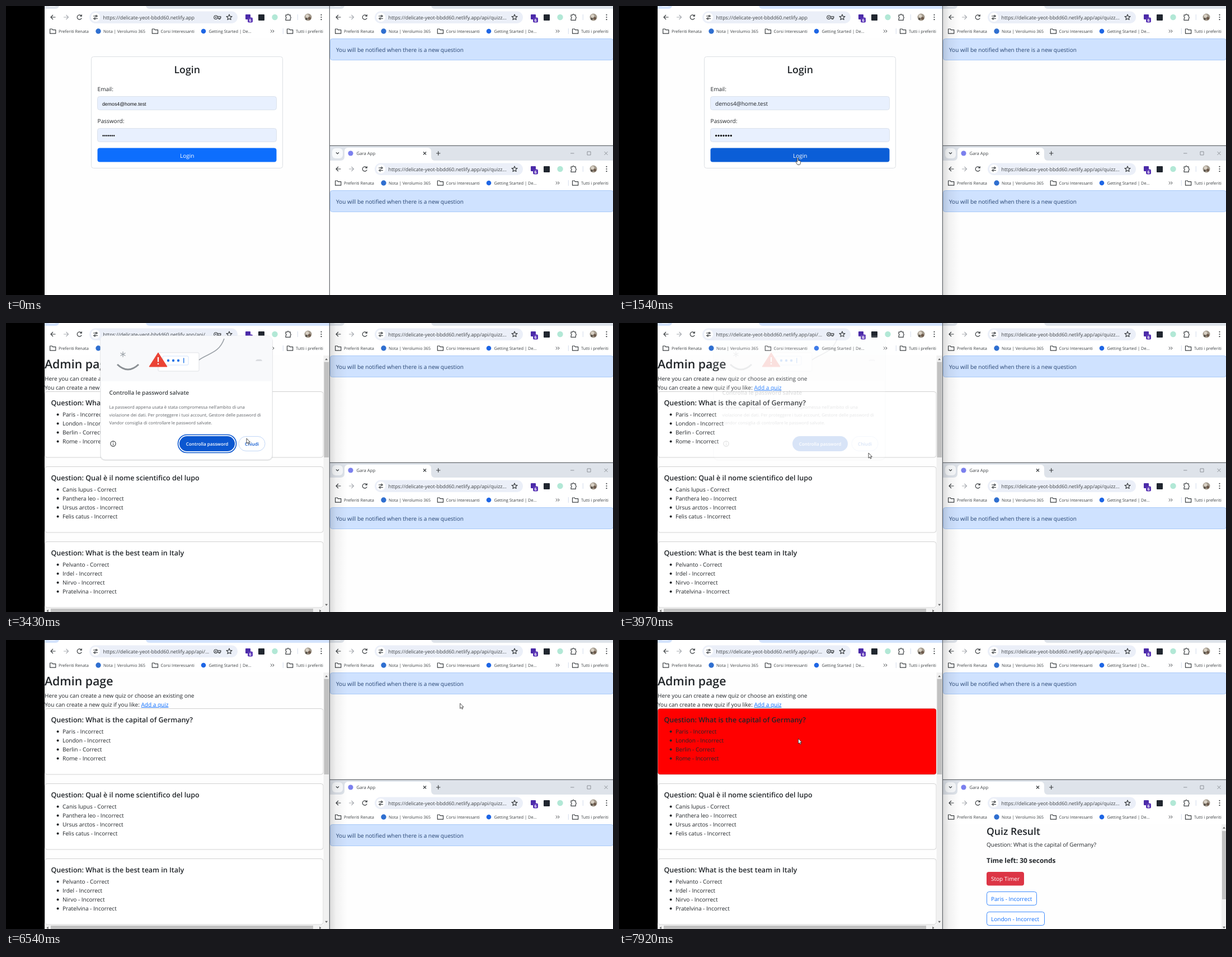
Write an HTML page that moves like this. It is 1085x516 px and loops after 7.99 s.

```html
<!DOCTYPE html>
<html lang="en">
<head>
<meta charset="utf-8">
<title>Quiz login</title>
<style>
  html, body { margin: 0; width: 100%; height: 100%; overflow: hidden; background: #fff; }
  svg { display: block; width: 1085px; height: 516px; }
  text { font-family: "Open Sans", "Noto Sans", sans-serif; text-rendering: geometricPrecision; white-space: pre; }
  .arial { font-family: "Liberation Sans", Arial, sans-serif; }
  .line { fill: none; stroke: #3c4043; stroke-width: 1.2; }
</style>
</head>
<body>
<svg id="stage" viewBox="0 0 1085 516"></svg>
<script>
const LOOP = 7990;
const INK = '#212529', BLUE = '#0d6efd';
const BODY = 10.04, UI = 7.45;

// ---- drawing helpers ----
const text = (x, y, size, str, fill = INK, attrs = '') =>
  `<text x="${x}" y="${y}" font-size="${size}" fill="${fill}" ${attrs}>${str}</text>`;
const rect = (x, y, w, h, fill, r = 0, attrs = '') =>
  `<rect x="${x}" y="${y}" width="${w}" height="${h}" rx="${r}" fill="${fill}" ${attrs}/>`;
const dot = (x, y, r, fill) => `<circle cx="${x}" cy="${y}" r="${r}" fill="${fill}"/>`;
const line = (d, attrs = '') => `<path class="line" d="${d}" ${attrs}/>`;
const stroke = c => `stroke="${c}"`;
const color = c => `style="stroke:${c}"`;
const group = (id, body, attrs = '') => `<g id="${id}" ${attrs}>${body}</g>`;
const SEMI = 'font-weight="600"', BOLD = 'font-weight="700"', MID = 'text-anchor="middle"';

function star(cx, cy, r) {
  let d = '';
  for (let i = 0; i < 10; i++) {
    const a = i * Math.PI / 5 - Math.PI / 2, q = i % 2 ? r * 0.45 : r;
    d += `${i ? 'L' : 'M'}${(cx + q * Math.cos(a)).toFixed(2)},${(cy + q * Math.sin(a)).toFixed(2)}`;
  }
  return line(d + 'Z', 'stroke-linejoin="round"');
}

const folder = x => line(`M${x},41h3.6l1.4,1.6h5.2v6.6h-10.2Z`, 'stroke-linejoin="round"');

function avatar(x, y) {
  return dot(x, y, 6.5, '#a39a8d') + dot(x - 1.5, y - 2, 3, '#d8d0c4') +
    dot(x + 2.5, y + 2, 2.6, '#6d5a4c') + dot(x - 3, y + 3, 2, '#57514a');
}

// Browser frame, laid out for the left window and shifted for the others.
function browser(id, dx, dy, url, withKey) {
  const strip = `<rect id="${id}Strip" x="69" y="-21" width="509" height="26" fill="#dee3ea"/>`;
  const tab = `<path d="M88,5q7,0 7,-7v-9q0,-7 7,-7h141q7,0 7,7v9q0,7 7,7Z" fill="#fff"/>` +
    rect(73, -17, 19, 18, '#f8fafc', 6) + line('M80,-9.5l2.5,2.5l2.5,-2.5') +
    dot(106, -8, 4.6, '#7b80ee') + text(116.5, -5.3, 7.75, 'Gara App', '#3c4043') +
    line('M236,-10.5l5,5m0,-5l-5,5') + line('M259,-8h7.4m-3.7,-3.7v7.4') +
    line('M499,-8h6.5M529,-11h6v6h-6ZM559.5,-11l6,6m0,-6l-6,6', 'style="stroke:#85898f;stroke-width:.9"');

  const nav = line('M88.5,20h-8.5m4,-4l-4,4l4,4') +
    line('M103,20h8.5m-4,-4l4,4l-4,4', color('#a9adb2')) +
    line('M134.6,17.6a4.1,4.1 0 1 0 .6,3.8M135.3,15.2v3h-3') +
    rect(149, 9.5, 265, 21.5, '#ebeff8', 10.75) + dot(160, 20, 8, '#fff') +
    line('M156,18h3.5M162.5,18h1.5M156,22.5h1.5M160.5,22.5h3.5') +
    `<circle class="line" cx="161.3" cy="18" r="1.3"/><circle class="line" cx="158.7" cy="22.5" r="1.3"/>` +
    text(173.5, 23.5, 8.87, url, '#3c4043', `id="${id}Url"`) +
    (withKey ? `<circle class="line" cx="375" cy="20.2" r="3.2"/>` + dot(375, 20.2, 1.1, '#3c4043') +
      line('M378,18.9h5.8v2.6h-1.2v1.8h-2.2v-1.8h-2.4') : '') +
    star(399, 20.3, 5.2);

  const tools = rect(428, 15, 9, 9, '#4b2ba8', 1) + rect(432, 20.5, 9, 9, '#5a35b5', 2) +
    text(436.5, 27.8, 7, '6', '#fff', `${MID} ${BOLD}`) +
    rect(451, 15, 11, 11, '#20262f', 1) + dot(480.5, 20, 5.2, '#b2e8d6') +
    line('M500,16.2h2.6a1.6,1.6 0 0 1 3.2,0h2.4v3a1.7,1.7 0 0 1 0,3.2v3h-8.2v-2.8a1.7,1.7 0 0 0 0,-3.2Z') +
    rect(520.8, 15, 1, 10, '#d4dcec') + avatar(540, 20) +
    [15.8, 20, 24.2].map(y => dot(563.5, y, 1.1, '#3c4043')).join('');

  const label = (x, s) => text(x, 48, UI, s, '#3c4043');
  const marks = folder(78.6) + label(94, 'Preferiti Renata') +
    dot(165, 45, 4.7, '#2f6fd0') + label(174, 'Nota | Verolumio 365') +
    folder(261.3) + label(276.5, 'Corsi Interessanti') +
    dot(353, 45, 4.3, '#1e66e5') + label(362.5, 'Getting Started | De...') +
    line('M473,42.5l2.5,2.5l-2.5,2.5M476.5,42.5l2.5,2.5l-2.5,2.5', 'style="stroke-width:1"') +
    rect(494.8, 40, 1, 10, '#d4dcec') + folder(502.5) + label(518, 'Tutti i preferiti');

  return `<g transform="translate(${dx} ${dy})">` + strip + tab +
    rect(69, 5, 509, 53, '#fff') + nav + tools + marks + '</g>';
}

function alertBox(y) {
  return rect(579.5, y + 0.5, 506, 38, '#cfe2ff', 4, stroke('#a9caf8')) +
    text(590, y + 23.5, BODY, 'You will be notified when there is a new question', '#274572');
}

function loginPage() {
  const field = y => rect(163.5, y, 320, 24, '#e8f0fe', 4, stroke('#dbe2ec'));
  const dots = (step, r) => Array.from({ length: 7 }, (_, i) => dot(173.6 + i * step, 231.5, r, '#111')).join('');
  return rect(69, 58, 509, 458, '#fefefe') +
    rect(152.5, 90.5, 342, 199, '#fff', 4, stroke('#dcdfe3')) +
    text(323.7, 120, 17.7, 'Login', INK, `${MID} ${SEMI}`) +
    text(163.6, 152, BODY, 'Email:') + field(161.5) +
    text(163.6, 209, BODY, 'Password:') + field(218.5) +
    group('preview', text(172, 178, 8.75, 'demos4@home.test', '#111', 'class="arial"') + dots(3.25, 1.25)) +
    group('filled', text(172, 177.7, BODY, 'demos4@home.test') + dots(4.45, 1.65)) +
    `<rect id="submit" x="163.5" y="253.5" width="320" height="25" rx="4"/>` +
    text(323.7, 270.6, BODY, 'Login', '#fff', MID);
}

function card(i, title, items) {
  const y = 122.5 + 134 * i;
  return rect(69.5, y, 497.5, 117.5, '#fff', 4, `stroke="#000" stroke-opacity=".175" id="card${i}"`) +
    text(80.5, y + 24, 12.5, 'Question: ' + title, INK, SEMI) +
    items.map(([name, mark], k) => dot(92.6, y + 41 + 16 * k, 2, INK) +
      text(101, y + 44.6 + 16 * k, BODY, `${name} - ${mark || 'Incorrect'}`)).join('');
}

const tri = (x, y, dx, dy) =>
  `<path d="M${x + dx * 2},${y + dy * 2}L${x - dx * 1.2 + dy * 2.4},${y - dy * 1.2 + dx * 2.4}L${x - dx * 1.2 - dy * 2.4},${y - dy * 1.2 - dx * 2.4}Z" fill="#666"/>`;

function adminPage() {
  const bars = rect(567.5, 58, 10.5, 451, '#f1f1f1') + rect(568.5, 69.5, 8.5, 170.5, '#c1c1c1') +
    tri(572.7, 65, 0, -1) + tri(572.7, 503, 0, 1) +
    rect(69, 509, 509, 7, '#f1f1f1') + rect(80, 510, 469, 6, '#c1c1c1') +
    tri(74.5, 514, -1, 0) + tri(561.5, 514, 1, 0);
  const right = name => [name, 'Correct'];
  return rect(69, 58, 509, 458, '#fefefe') +
    text(69, 81, 21.3, 'Admin page', INK, SEMI) +
    text(69, 102.7, BODY, 'Here you can create a new quiz or choose an existing one') +
    text(69, 118.7, BODY, 'You can create a new quiz if you like: ' +
      `<tspan fill="${BLUE}" text-decoration="underline">Add a quiz</tspan>`) +
    group('cards',
      card(0, 'What is the capital of Germany?', [['Paris'], ['London'], right('Berlin'), ['Rome']]) +
      card(1, 'Qual è il nome scientifico del lupo', [right('Canis lupus'), ['Panthera leo'], ['Ursus arctos'], ['Felis catus']]) +
      card(2, 'What is the best team in Italy', [right('Pelvanto'), ['Irdel'], ['Nirvo'], ['Pratelvina']]) + bars);
}

function dialog() {
  const note = (y, s) => text(184.5, y, 7.75, s, '#5f6368');
  const art = `<path d="M169,104V31q0,-8 8,-8h291q8,0 8,8v73Z" fill="#f8f9fb"/>` +
    line('M199,74q19,18 38,0', 'style="stroke:#8a8f94;stroke-width:3"') +
    line('M209,51v10M204.5,53.5l9,5M204.5,58.5l9,-5', color('#9aa0a6')) +
    rect(272, 53, 73, 33, '#fff', 2, stroke('#dfe2e6')) +
    line('M345,66c16,-12 36,-12 45,-38', 'style="stroke:#9aa0a6;stroke-width:1.6"') +
    rect(280, 59, 46, 16, '#fff', 2, stroke('#d2e3fc')) +
    [290, 299, 308].map(x => dot(x, 67, 2.2, '#1a73e8')).join('') + rect(317, 62.5, 1.4, 9, '#1a73e8') +
    `<path d="M272,53L288,78H256Z" fill="#ea4335" stroke="#ea4335" stroke-linejoin="round"/>` +
    rect(270.9, 61, 2.2, 8.5, '#fff') + dot(272, 73, 1.3, '#fff') +
    `<path d="M446,68q2,-4 6,-3q5,-1 6,3Z" fill="#dadce0"/>`;
  return rect(168, 24, 309, 222, '#00000018', 9) + rect(169, 23, 307, 221, '#fff', 8, stroke('#e4e6e9')) + art +
    text(184.5, 128, 10.1, 'Controlla le password salvate', '#3c4043', SEMI) +
    note(152.5, "La password appena usata è stata compromessa nell'ambito di una") +
    note(166.5, 'violazione dei dati. Per proteggere i tuoi account, Gestore delle password di') +
    note(180.5, 'Vandor consiglia di controllare le password salvate.') +
    `<circle class="line" cx="191.5" cy="215.5" r="4.6"/>` + rect(191, 215, 1.1, 3, '#3c4043') + dot(191.5, 213, 0.8, '#3c4043') +
    group('ring', rect(307.5, 199.5, 104, 32, 'none', 16, `${stroke('#0b57d0')} stroke-width="1.6"`)) +
    rect(310, 202, 99, 27, '#0b57d0', 13.5) +
    text(359.5, 218.5, 8.1, 'Controlla password', '#fff', `${MID} ${SEMI}`) +
    rect(416, 202.5, 47, 26, '#fff', 13, stroke('#c2d7f7')) +
    text(439.5, 218.5, 8.1, 'Chiudi', '#0b57d0', `${MID} ${SEMI}`);
}

function resultPage() {
  const option = (y, w, s) => rect(657.5, y, w, 24, '#fff', 4, `${stroke(BLUE)} stroke-width=".8"`) +
    text(665, y + 16.5, BODY, s, BLUE);
  return rect(579, 329, 506, 187, '#fefefe') +
    text(657, 347.6, 17.6, 'Quiz Result', INK, SEMI) +
    text(657, 369.2, BODY, 'Question: What is the capital of Germany?') +
    text(657, 398.2, 11.9, 'Time left: 30 seconds', INK, BOLD) +
    rect(657, 414, 67, 24.5, '#dc3545', 4) + text(665, 430.3, BODY, 'Stop Timer', '#fff') +
    option(449.5, 89, 'Paris - Incorrect') + option(485.5, 103, 'London - Incorrect') +
    rect(1077, 329, 8, 187, '#f1f1f1') + rect(1078, 341, 7, 122, '#c1c1c1') +
    tri(1081.5, 335.5, 0, -1) + tri(1081.5, 513, 0, 1);
}

// Cast by the left window on the others while it has the focus.
const shadow = `<linearGradient id="fall"><stop offset="0" stop-opacity=".14"/>` +
  `<stop offset=".35" stop-opacity=".05"/><stop offset="1" stop-opacity="0"/></linearGradient>` +
  rect(579, 0, 31, 516, 'url(#fall)');

const pointer = group('click', dot(0, 0, 8, '#ffee1f'), 'opacity=".75"') +
  group('arrow', '<path d="M0,0V9.2L2.1,7.3L3.5,10.3L5,9.6L3.6,6.7H6.4Z" fill="#fff" stroke="#222" stroke-width=".8"/>') +
  group('beam', '<path d="M-2,-3.5h4M0,-3.5v8M-2,4.5h4" stroke="#333" fill="none"/>') +
  group('hand', '<path d="M-.9,1a.9,.9 0 0 1 1.8,0v4l3,.6q1.4,.4 1.2,2l-.6,3.2q-.3,1.7 -1.6,1.7h-2.3q-1.2,0 -1.8,-1.2l-2.4,-4q.4,-1.2 1.7,-.4l1,.9Z" fill="#fff" stroke="#222" stroke-width=".8"/>');

const HOST = 'https://delicate-yeot-bbdd60.netlify.app';
document.getElementById('stage').innerHTML =
  rect(0, 0, 1085, 516, '#fefefe') +
  group('login', loginPage()) + group('admin', adminPage()) +
  browser('left', 0, 0, HOST, true) +
  browser('top', 510, 0, HOST + '/api/quizz...', false) + alertBox(58) +
  rect(579, 249, 506, 267, '#fefefe') +
  browser('low', 510, 271, HOST + '/api/quizz...', false) + alertBox(329) +
  group('result', resultPage()) + group('shadow', shadow) +
  rect(0, 0, 69, 516, '#000') + rect(577.8, 0, 1.2, 516, '#62666b') + rect(578, 248.8, 507, 1.2, '#62666b') +
  group('dialog', dialog()) + group('pointer', pointer);

// ---- motion ----
const $ = id => document.getElementById(id);
const show = (id, on) => { $(id).style.display = on ? '' : 'none'; };
const ramp = (t, a, b) => Math.min(1, Math.max(0, (t - a) / (b - a)));
const within = (t, a, b) => t >= a && t < b;

// time, x, y
const PATH = [
  [120, 900, 476], [450, 640, 390], [700, 380, 296], [870, 320, 272], [1070, 319.5, 271], [2600, 319.5, 271],
  [2730, 335, 278], [3000, 395, 240], [3350, 430, 206], [3640, 430, 206], [3800, 430, 197],
  [3970, 446, 232], [4370, 446, 232], [4700, 520, 240], [5130, 624, 246],
  [5330, 712.5, 206], [5510, 630, 245], [5870, 397, 254], [6000, 397, 254],
  [6550, 812, 113], [6750, 771, 170], [7200, 470, 267], [7530, 320.5, 176], [LOOP, 320.5, 176]
];

// Monotone cubic: smooth, with no overshoot at turns and rests.
function slope(i, k) {
  if (!i || i === PATH.length - 1) return 0;
  const [p, q, r] = [PATH[i - 1], PATH[i], PATH[i + 1]];
  const a = (q[k] - p[k]) / (q[0] - p[0]), b = (r[k] - q[k]) / (r[0] - q[0]);
  return a * b <= 0 ? 0 : 2 * a * b / (a + b);
}

function along(t, k) {
  let i = 0;
  while (i < PATH.length - 2 && t >= PATH[i + 1][0]) i++;
  const p = PATH[i], q = PATH[i + 1], dt = q[0] - p[0], u = ramp(t, p[0], q[0]);
  const v = u * u * (3 - 2 * u);
  return p[k] + (q[k] - p[k]) * v +
    dt * (slope(i, k) * u * (1 - u) ** 2 - slope(i + 1, k) * u * u * (1 - u));
}

function render(t) {
  const focused = t >= 1330, loggedIn = t >= 2410, answered = t >= 7900;
  show('login', !loggedIn);
  show('admin', loggedIn);
  show('cards', t >= 2600);
  show('preview', !focused);
  show('filled', focused);
  show('shadow', focused);
  $('leftStrip').setAttribute('fill', focused ? '#d3e3fd' : '#dee3ea');
  $('leftUrl').textContent = HOST + (loggedIn ? '/api/...' : '');

  const h = ramp(t, 860, 1060), mix = (a, b) => Math.round(a + (b - a) * h);
  $('submit').setAttribute('fill', `rgb(${mix(13, 11)},${mix(110, 94)},${mix(253, 215)})`);

  const open = ramp(t, 2660, 2800), alpha = open * (1 - ramp(t, 3820, 3998));
  const s = 0.97 + 0.03 * open, drop = 3.2 * (1 - open);
  show('dialog', alpha > 0);
  show('ring', t < 3640);
  $('dialog').setAttribute('opacity', alpha);
  $('dialog').setAttribute('transform', `translate(322 ${247 + drop}) scale(${s}) translate(-322 -247)`);

  $('card0').setAttribute('fill', answered ? '#f00' : '#fff');
  show('result', answered);

  const x = along(t, 1), y = along(t, 2);
  const hand = !loggedIn && within(x, 163, 484) && within(y, 253, 279);
  const beam = within(t, 2690, 2790);
  show('pointer', t >= 120);
  show('hand', hand);
  show('beam', beam);
  show('arrow', !hand && !beam);
  show('click', within(t, 1330, 1500) || within(t, 3640, 3800) || within(t, 7700, 7900));
  $('pointer').setAttribute('transform', `translate(${x} ${y})`);
}

const start = performance.now();
function tick() {
  render((performance.now() - start) % LOOP);
  requestAnimationFrame(tick);
}
tick();
</script>
</body>
</html>
```
